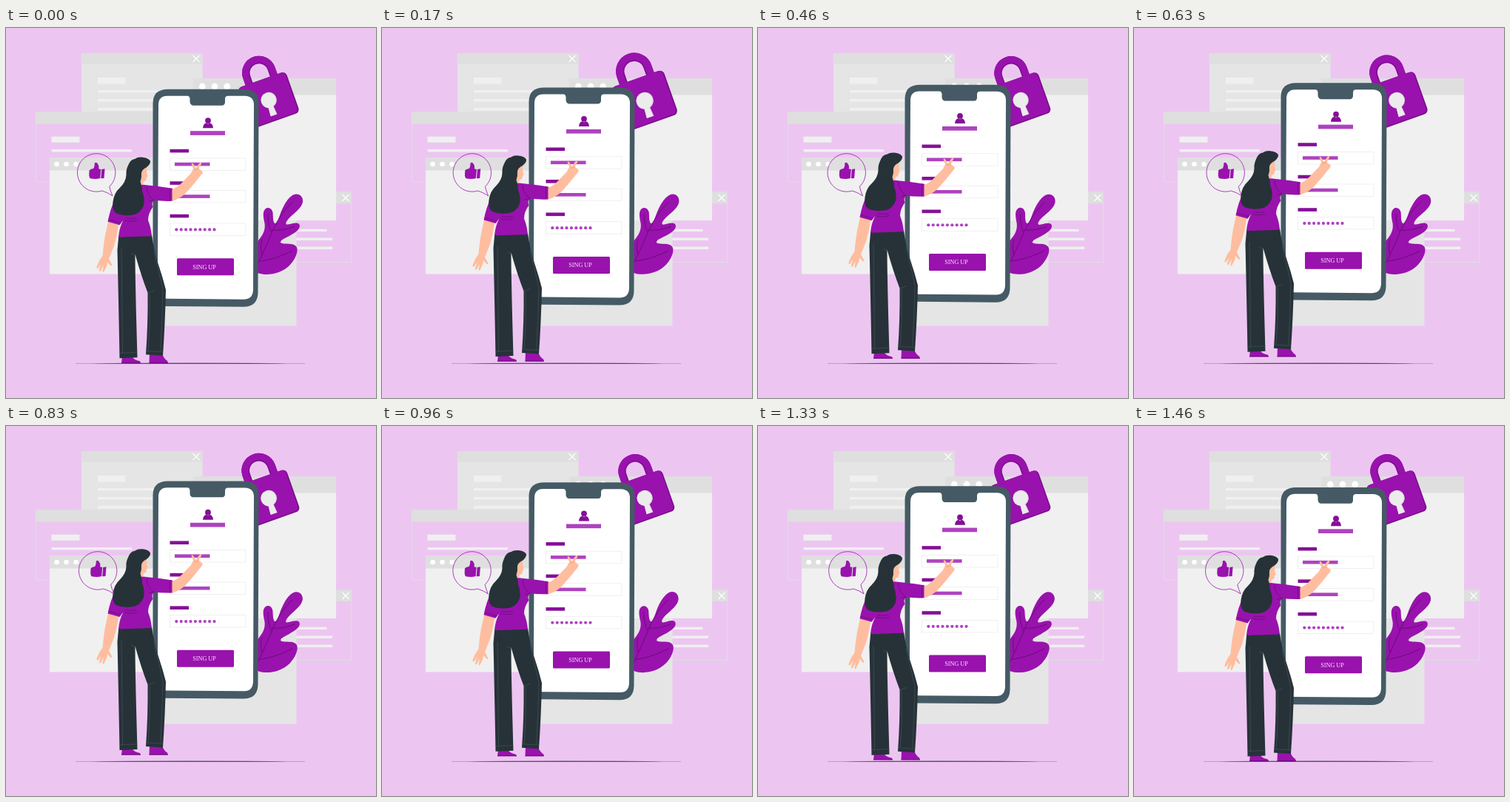
Animation, 500 px wide and 500 px high, one loop 1500 ms. Source, as an HTML page:

```html
<!DOCTYPE html>
<html lang="en">
<head>
<meta charset="utf-8">
<title>Sign-up form</title>
<style>
  html, body { margin: 0; width: 100%; height: 100%; overflow: hidden; background: #ecc6f1; }
  svg { display: block; width: 100%; height: 100%; }
  .main { fill: #9912ad; }
  .deep { fill: #850f97; }
  .soft { fill: #ae42c0; }
  .head { fill: #dfdfdf; }
  .pane { fill: #e5e5e5; }
  .pale { fill: #f0f0f0; }
  .skin { fill: #ffbd9f; }
  .dark { fill: #263238; }
  .vein { fill: none; stroke: #5f0a6d; stroke-width: .8; stroke-linecap: round; }
  .seam { fill: none; stroke: #53646c; stroke-width: .6; }
  .frame { fill: none; stroke: #dedede; stroke-width: 1; }
  .cross { fill: none; stroke: #fff; stroke-width: 1.2; }
  .field { fill: #fff; stroke: #ececec; stroke-width: .8; }
</style>
</head>
<body>
<svg viewBox="0 0 500 500">
  <rect width="500" height="500" fill="#ecc6f1"/>

  <g id="windows">
    <rect class="pane" x="102" y="34" width="163.5" height="94"/>
    <rect class="head" x="102" y="34" width="163.5" height="14.5"/>
    <path class="cross" d="M252.5 37l9 9m0-9l-9 9"/>
    <path class="pale" d="M124 67h37.5v8.5H124zM124 84h90v3.5h-90zM124 96h90v3.5h-90zM124 108h90v3.5h-90z"/>

    <rect class="frame" x="40.5" y="114" width="170" height="94"/>
    <rect class="head" x="40" y="113.5" width="171" height="16"/>
    <path class="pale" d="M61.5 146.8h38v8h-38zM61.5 164h108.5v3.5h-108.5z"/>

    <rect class="frame" x="380" y="222" width="86.5" height="94.5"/>
    <rect class="head" x="380" y="221.5" width="87" height="15.5"/>
    <path class="cross" d="M454.5 225l9 9m0-9l-9 9"/>
    <path class="pale" d="M380 271.8h53.5v3.3H380zM380 283.5h61v3.5h-61zM380 295.5h61v3.5h-61z"/>

    <rect class="pane" x="206" y="240" width="186.5" height="162.5"/>

    <rect class="pale" x="59" y="175.5" width="160" height="157"/>
    <rect class="head" x="59" y="175.5" width="160" height="17"/>

    <rect class="pale" x="253" y="68" width="193" height="192"/>
    <rect class="head" x="253" y="68" width="193" height="22.5"/>
    <g id="lights" fill="#fff"></g>
  </g>

  <path d="M94 453.4H404" stroke="#95809c" stroke-width=".6"/>
  <path d="M115 453.4Q160 452.6 248 452.6T380 453.4Q336 454 248 454T115 453.4Z" fill="#5d4f66"/>

  <g id="leaf">
    <path class="main" d="M334 326C339 312 336 294 341 287C346 281 351 274 349.5 264C347.500 255 346.500 248 350.500 244.500C354 241.500 359 243 360.500 249C361 255 360.500 261 363 264C366 265 368 258 370 253C374 241 381 229 388 225.500C395 222 402 227 401 235C399.500 243 391 249 384 255.500C380 259.500 377 263.500 379 265.500C384 266 393 260.500 396.500 265.500C399 272 390 277 382 281.500C375 285 369.500 287.500 371.500 290.500C378 293 388 289.500 392.500 295.500C396 301 391 313 383 321C375 329 363 333 352 333C344 333 338 331 334 326Z"/>
    <path class="vein" d="M338 323C346 308 353 291 360 275C367 259 376 246 387 235M359 276C355 269 354 260 354 252M361 273C371 274 380 272 390 268M343 315C355 314 371 309 387 301M346 306C344 299 344 294 346 286"/>
  </g>

  <g id="lock">
    <g transform="translate(355 97.5) rotate(-19.5)">
      <path d="M-17.500 -25V-38.900A17.500 17.500 0 0 1 17.500 -38.900V-25" fill="none" stroke="#7c0d8d" stroke-width="10.4"/>
      <path d="M-18.300 -25V-38.900A18.300 18.300 0 0 1 18.300 -38.900V-25" fill="none" stroke="#9912ad" stroke-width="8.8"/>
      <rect x="-34.2" y="-29.2" width="68.4" height="58.4" rx="6" fill="#7c0d8d"/>
      <rect class="main" x="-34.2" y="-29.2" width="66.8" height="56.8" rx="5.5"/>
      <path d="M-3 5L-4.500 21.500H4.500L3 5Z" fill="#dcd6de"/>
      <circle cx=".2" r="10.6" fill="#dcd6de"/>
      <circle cx="-.3" cy="-.3" r="10" fill="#ececec"/>
      <path d="M-3.500 5L-4.800 21H3.500L2.500 5Z" fill="#ececec"/>
    </g>
  </g>

  <g id="scene">
    <g id="phone">
      <path d="M219 83H322Q341.500 83.500 341.500 101L340.500 358Q340 377 321 377L215 376.200Q199 375.500 198.500 358V102Q198.500 83 219 83Z" fill="#455a64"/>
      <path d="M218 91.800H245Q248.500 92 248.500 96V100Q249 104.800 253 104.800H292Q296 104.800 296 100V96Q296 92 300 92H323Q335 92.500 335 104L334 354Q333.500 366.800 322 366.800L217 366Q205 365.500 204.800 354L206 104Q206 92 218 91.800Z" fill="#fff"/>
      <g class="deep">
        <circle cx="273" cy="125.2" r="3.9"/>
        <path d="M266 135.400Q266.500 128.900 271 128.400L273 129.900L275 128.400Q279.500 128.900 280 135.400Z"/>
      </g>
      <rect class="soft" x="249" y="139.3" width="47" height="5.7"/>
      <g id="form"></g>
      <rect class="main" x="231" y="311.3" width="77" height="23" rx="1.5"/>
      <text x="268" y="325.8" text-anchor="middle" font-family="'Liberation Serif', serif" font-size="8.2" fill="#f6e6f9">SING UP</text>
    </g>

    <g id="woman">
      <!-- shoes -->
      <path class="main" d="M157 444H170Q173 449 181 450.500L182 453H156ZM194 440H211Q213 447 218 450L219 453H193.500Z"/>
      <path d="M156 452.500H182M193.500 452.500H219" stroke="#6c0a7b" stroke-width="1"/>

      <!-- far arm and hand -->
      <path class="skin" d="M138.500 260L152.500 264Q149.500 284 145.500 296L139 312L143.500 320.500Q143 322.500 141 321L137 316.500L136.500 321L132.500 329.500Q130.500 331 130.500 328.500L132 321L128 328.500Q126 330 125.800 327.500L128.500 319L124.500 325Q122 326 122.500 323Q125 315 130.500 308Q132 290 134.500 278Z"/>

      <!-- trousers -->
      <path class="dark" d="M152.300 281L197 280Q200 302 206 320Q212 338 216 354Q215 400 212 443L189 441.500Q192 400 191.500 358Q183 336 174.500 306Q174.500 340 177.500 445.500L153.500 446.500Q152.500 390 150.500 300Z"/>
      <path class="seam" d="M170 304Q169 307 174.500 306M192 358L201 355M194 359Q195 400 192 436M153.500 439.500L176 438.500M190 436.500L212 438M156 298Q157 370 157.500 440M200 302Q207 330 212 354Q211 400 208.500 437" opacity=".75"/>

      <!-- neck and face -->
      <path class="skin" d="M176 186H189.500Q190.500 192 190.300 196L191.500 200.500L190 202.500Q190 207.500 186 207.500L184 215L174 217Z"/>

      <!-- blouse -->
      <path class="main" d="M150 231Q165 214 185 212Q206 214 225 217V234Q212 234.500 200 233Q196 237 198.500 242Q192 251 192 260Q196 270 197 281.500L152 283Q153 270 158.500 260L153.500 266.500L137.500 262Q141 244 147 233Z"/>
      <path class="vein" d="M139 259L154.500 263.500M221.500 217V233.500M190 215Q190 226 200 233M200 233L194 234M160 260Q168 263 177 260M162 257Q170 259 176 257" opacity=".8"/>

      <!-- hair -->
      <path class="dark" d="M165 186Q168 178 174 177.200Q178 174.400 184 174.800Q192 175.300 195 180Q195.500 184 190 188.500Q184 191 183 196Q183.500 203 181.500 208Q184 214 184 221Q188 231 186 240Q182 250 173 252.500Q158 255 148 250Q143 245 144.500 235Q146 223 154 216Q162 208 162.500 199Q162 192 165 186Z"/>

      <!-- pointing arm -->
      <path class="skin" d="M224.500 218.500Q231 216 236 211L250 196.500Q251.500 192 253.500 191L250.500 184Q251.500 182 253 183.500L256.500 189.500L262 181.800Q264.500 181 264.300 183.500L260.500 190L265.800 194.500Q266 197 263.500 199Q255 210 246 220Q238 230 224.500 234.200Z"/>
      <path d="M253.500 191Q256 193.500 260.500 190" fill="none" stroke="#e8927a" stroke-width=".7"/>
    </g>
  </g>

  <g id="bubble">
    <path d="M139.800 214.200A25.700 25.700 0 1 0 129.800 220Q137 222 144 226.800Q141 220 139.800 214.200Z" fill="none" stroke="#9912ad" stroke-width=".8"/>
    <path class="main" d="M112.800 192.500Q113.500 191 116 190.500L118.500 189.800Q120.300 186.500 119.800 183Q120.800 180.800 123 182.300Q126.300 186 125.300 190.300L128.300 191L127.300 203Q122 204.500 115 203.500Q112.500 203 112.800 201Q111.800 200 112.500 198Q111.800 196.500 112.700 195Q112 193.500 112.800 192.500Z"/>
    <path class="main" d="M129.300 190.900L133.600 190.300L132.600 203L128.300 203.300Z"/>
  </g>
</svg>

<script>
const LOOP = 1500;
const FRAMES = 36;
const $ = id => document.getElementById(id);

const rect = (cls, x, y, w, h) =>
  `<rect class="${cls}" x="${x}" y="${y}" width="${w}" height="${h}"/>`;
const dots = (n, x, y, step, r, cls = "") =>
  Array.from({ length: n }, (_, i) =>
    `<circle class="${cls}" cx="${x + i * step}" cy="${y}" r="${r}"/>`).join("");

$("lights").innerHTML = dots(3, 68.5, 184, 13, 3.3) + dots(3, 265.3, 79, 16.7, 4.4);

$("form").innerHTML = [163.9, 207.4, 251.9].map((y, i) =>
  rect("deep", 221.5, y, 25.5, 4.6) +
  rect("field", 221.5, y + 12.2, 102.5, 16.5) +
  (i < 2 ? rect("soft", 228, y + 18, 47.5, 4.6)
         : dots(9, 230.3, y + 20.7, 6.4, 2.1, "soft"))
).join("");

// Keyframes as [position, value] pairs, joined by straight lines.
const FLOAT = [[0, 0], [.5, -10], [1, 0]];
const SWAY = [[0, 0], [.25, 1], [.75, -1], [1, 0]];
const BEAT = [[0, 1], [.1, 1.1], [.3, 1], [.4, 1], [.5, 1.1], [.6, 1], [1, 1]];
const SHAKE = [[0, 0], [.1, -1], [.2, 2], [.3, -4], [.4, 4], [.5, -4],
               [.6, 4], [.7, -4], [.8, 2], [.9, -1], [1, 0]];

function track(keys, p) {
  const i = Math.max(1, keys.findIndex(k => k[0] >= p));
  const [a, from] = keys[i - 1];
  const [b, to] = keys[i];
  return from + (to - from) * (p - a) / (b - a);
}

const move = (id, value) => $(id).setAttribute("transform", value);

function draw(ms) {
  // The motion runs in 24 steps per second.
  const step = Math.floor((ms % LOOP + 5) * FRAMES / LOOP) % FRAMES;
  const p = (step + .25) / (FRAMES - .7);
  move("scene", `translate(0 ${track(FLOAT, p)})`);
  move("leaf", `rotate(${track(SWAY, p)} 368 278)`);
  move("lock", `translate(355 88) scale(${track(BEAT, p)}) translate(-355 -88)`);
  move("bubble", `translate(${track(SHAKE, p)} 0)`);
}

let start;
function tick(now) {
  start ??= now;
  draw(now - start);
  requestAnimationFrame(tick);
}
draw(0);
requestAnimationFrame(tick);
</script>
</body>
</html>
```
